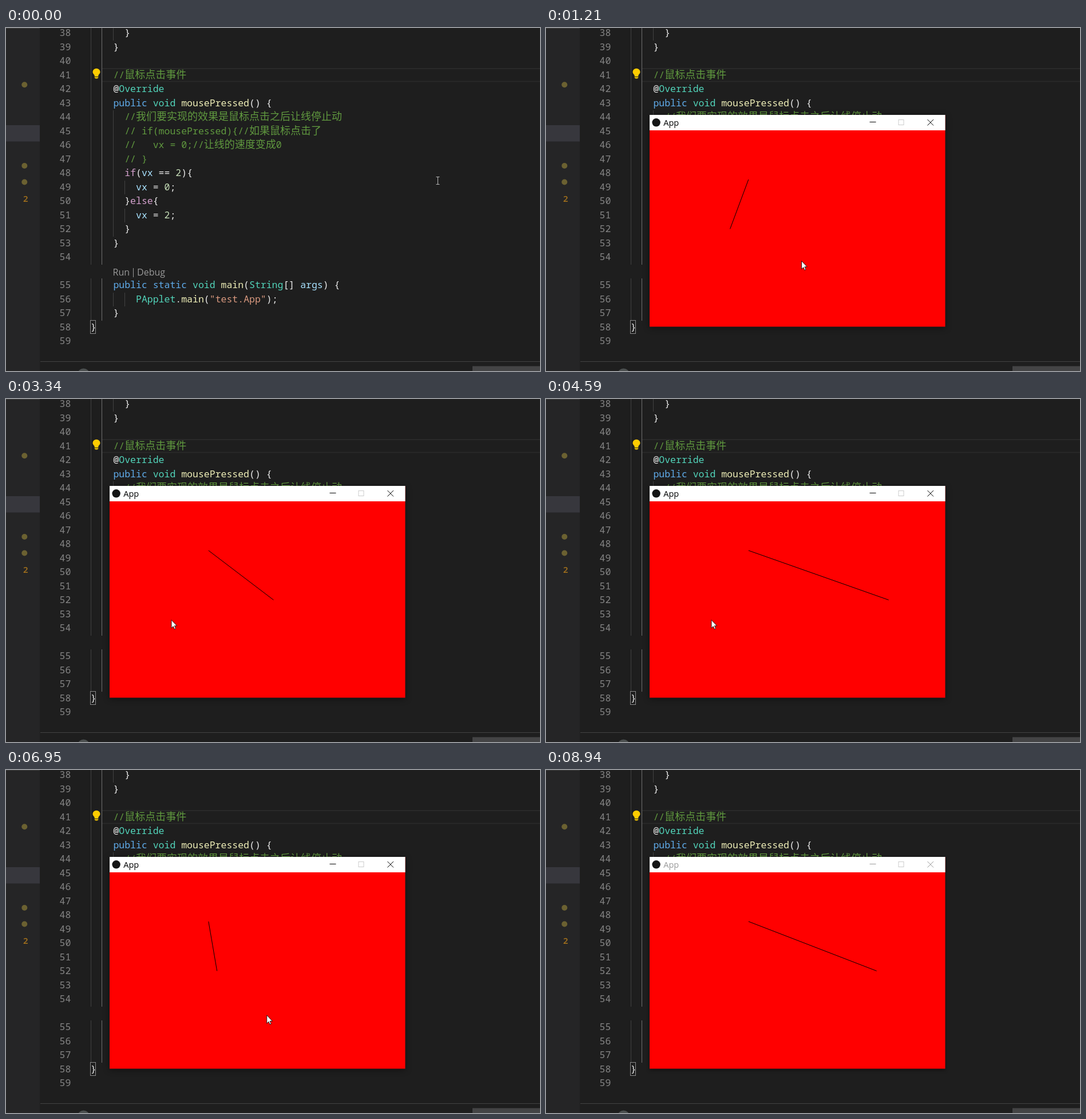
An HTML page that plays this animation: 933x600 px, repeating every 9.01 s.

```html
<!DOCTYPE html>
<html lang="zh">
<head>
<meta charset="utf-8">
<title>Moving line</title>
<style>
  html, body { margin: 0; width: 100%; height: 100%; overflow: hidden; background: #1e1e1e; }
  svg { display: block; width: 933px; height: 600px; }
  text { white-space: pre; }
  .code { font: 500 16.5px "Noto Sans Mono", monospace; }
  .cjk { font: 300 18px "Noto Sans CJK SC", "Noto Sans CJK", sans-serif; }
  .ui { font: 16px "Open Sans", sans-serif; fill: #999; }
</style>
</head>
<body>
<svg viewBox="0 0 933 600">
  <rect width="933" height="600" fill="#1e1e1e"/>
  <rect width="59" height="600" fill="#252526"/>
  <rect width="59" height="1" fill="#3c3c3c"/>
  <rect y="170" width="59" height="28.5" fill="#37373d"/>
  <g fill="#6b6131">
    <circle cx="32.3" cy="99.3" r="5"/>
    <circle cx="32.3" cy="241" r="5"/>
    <circle cx="32.3" cy="269.5" r="5"/>
  </g>
  <text x="30" y="304" style="font:600 15px 'Open Sans',sans-serif" fill="#a8741c">2</text>
  <path d="M168 71H933M168 93.5H933" stroke="#292929" stroke-width="2"/>
  <g id="rows"></g>
  <path d="M154.700 85V83C154.500 81.500 151.500 80 151.500 76.700A6.500 6 0 0 1 164.500 76.700C164.500 80 161.500 81.500 161.300 83V85ZM154.700 86H161.300V87Q160 88.500 158 88.500T154.700 87Z" fill="#fc0"/>
  <rect x="147.500" y="511.500" width="9" height="23" fill="none" stroke="#8a8a8a"/>
  <g class="ui">
    <text x="186.500" y="432.500">Run</text>
    <path d="M222.500 420V436" stroke="#999"/>
    <text x="229" y="432.500">Debug</text>
  </g>
  <path d="M60 583.500H933" stroke="#434343"/>
  <circle cx="135.500" cy="606" r="10.500" fill="#4b4f4f"/>
  <rect x="815" y="591.500" width="118" height="9" fill="#444445"/>

  <g id="win">
    <rect id="body" x="181" y="152" width="516.500" height="370.500"/>
    <rect x="181" y="152" width="516.500" height="27" fill="#fff"/>
    <path id="line" stroke="#000"/>
    <circle cx="192.600" cy="165.300" r="7.200" fill="#151515"/>
    <g id="title" fill="currentColor">
      <text x="205.300" y="170.800" style="font:14.500px 'Open Sans',sans-serif">App</text>
      <path d="M565.500 164.500H576.500M666.500 160L677 170.500M677 160L666.500 170.500" stroke="currentColor" fill="none"/>
    </g>
    <rect x="616" y="160.500" width="9" height="9" fill="none" stroke="#ccc"/>
  </g>

  <path id="arrow" d="M.5 .5V14.700L3.700 11.700L5.800 16.500L8 15.500L5.900 10.800H10.200Z" fill="#fff" stroke="#111" stroke-width=".9"/>
  <path id="beam" d="M-3 -6.500H3M0 -6.500V6.500M-3 6.500H3" fill="none" stroke="#b8b8b8"/>
  <circle id="busy" r="6.500" fill="none" stroke="#2b90e2" stroke-width="4.300"/>
</svg>
<script>
const LOOP = 9010, SPEED = 0.105;
const ROW = 24.5, CHAR = 9.9, LEFT = 147.5, FIRST = 38;
const $ = id => document.getElementById(id);
const COLORS = {
  c: '#60993f', k: '#5fabea', t: '#52d4ba', f: '#efefb8', i: '#d3a0cc',
  v: '#a8e2ff', n: '#c6deb8', s: '#d9997f', d: '#ececec'
};

// each row: indent, then tokens led by a colour key and split by "~"
const CODE = [
  '      d}',
  '    d}',
  '    ',
  '    c//鼠标点击事件',
  '    d@~tOverride',
  '    kpublic ~tvoid ~fmousePressed~d() {',
  '      c//我们要实现的效果是鼠标点击之后让线停止动',
  '      c// if(mousePressed){//如果鼠标点击了',
  '      c//   vx = 0;//让线的速度变成0',
  '      c// }',
  '      iif~d(~vvx~d == ~n2~d){',
  '        vvx~d = ~n0~d;',
  '      d}~ielse~d{',
  '        vvx~d = ~n2~d;',
  '      d}',
  '    d}',
  '    ',
  '    kpublic static ~tvoid ~fmain~d(~tString~d[] ~vargs~d) {',
  '        tPApplet~d.~fmain~d(~s"test.App"~d);',
  '    d}',
  'd}',
  ''
];

function add(parent, tag, attrs, text = '') {
  const el = document.createElementNS('http://www.w3.org/2000/svg', tag);
  for (const key in attrs) el.setAttribute(key, attrs[key]);
  el.textContent = text;
  return parent.appendChild(el);
}

function addTokens(row, tokens) {
  for (const token of tokens.split('~'))
    for (const part of token.slice(1).split(/([\u3000-\u9fff]+)/)) {
      if (!part) continue;
      const kind = part > '\u3000' ? 'cjk' : 'code';
      add(row, 'tspan', { class: kind, fill: COLORS[token[0]] }, part);
    }
}

CODE.forEach((src, i) => {
  const rows = $('rows'), n = FIRST + i;
  // the "Run | Debug" line takes one extra row
  const y = 14.4 + ROW * (n < 55 ? i : i + 1);
  const indent = src.search(/\S|$/);
  for (let col = 0; col < indent; col += 2)
    add(rows, 'rect', {
      x: LEFT + col * CHAR, y: y - 17, width: 1, height: ROW,
      fill: col === 2 ? '#707070' : '#414141', 'shape-rendering': 'crispEdges'
    });
  add(rows, 'text', { class: 'code', x: 93.6, y, fill: '#858585', style: 'font-weight:400' }, n);
  const row = add(rows, 'text', { class: 'code', x: LEFT + 0.3 + indent * CHAR, y });
  addTokens(row, src.slice(indent));
});

// pointer stops: time, x, y
const STOPS = [
  [390, 754.5, 267], [690, 692, 326], [1210, 446, 407], [2230, 446, 407],
  [2340, 425, 449], [2590, 274, 371], [2740, 274, 371], [2830, 288.5, 386],
  [6350, 288.5, 386], [7170, 516, 444], [7930, 872, 577.5], [8300, 880, 615]
];

const clamp = p => Math.max(0, Math.min(1, p));

function pointer(t) {
  let [at, x, y] = STOPS[0];
  for (const [end, nx, ny] of STOPS.slice(1)) {
    const p = clamp((t - at) / (end - at));
    x += (nx - x) * p;
    y += (ny - y) * p;
    at = end;
  }
  return [x, y];
}

// clicks stop and restart the line; past the right edge it starts again
function lineEnd(t) {
  const moved = Math.min(t, 2180) + Math.max(0, Math.min(t, 6070) - 2921) + Math.max(0, t - 6510);
  const x = 322 + SPEED * (moved - 1215);
  return x > 697 ? x - 431.6 : x;
}

function show(el, on) { el.style.display = on ? '' : 'none'; }

function draw(t) {
  const open = t > 600, ready = t > 760, active = t < 8600;

  const fade = 1 - Math.pow(1 - clamp((t - 600) / 150), 1.65);
  const win = $('win');
  show(win, open);
  win.setAttribute('opacity', fade);
  win.setAttribute('transform', `translate(439.2 337.3) scale(${0.95 + 0.05 * fade}) translate(-439.2 -337.3)`);
  win.style.filter = `drop-shadow(0 2px ${active ? 6 : 3}px rgba(0,0,0,.45))`;
  $('title').setAttribute('color', active ? '#000' : '#999');
  $('body').setAttribute('fill', ready ? '#f00' : '#fff');
  show($('line'), ready);
  $('line').setAttribute('d', `M353.8 265L${lineEnd(t).toFixed(2)} 351.5`);

  const [x, y] = pointer(t);
  const inside = open && x > 181 && x < 697 && y > 152 && y < 522;
  const kind = inside ? (ready ? 'arrow' : 'busy') : 'beam';
  for (const id of ['arrow', 'busy', 'beam']) {
    show($(id), id === kind);
    $(id).setAttribute('transform', `translate(${x} ${y})`);
  }
}

const begin = performance.now();
function tick() {
  draw((performance.now() - begin) % LOOP);
  requestAnimationFrame(tick);
}
tick();
</script>
</body>
</html>
```
